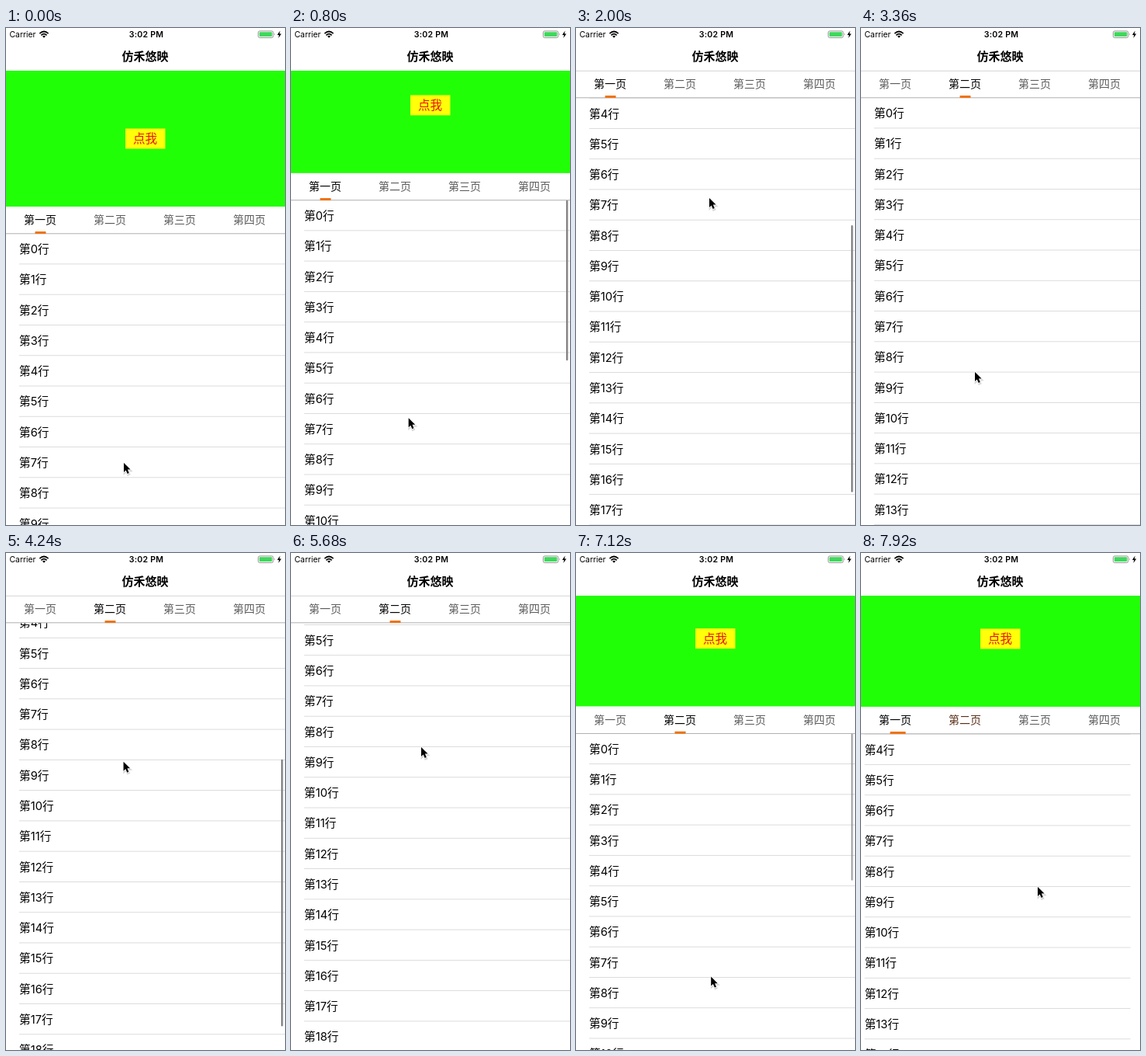
These frames come from a looping animation (360x640 px, 8 s). An HTML page:

```html
<!DOCTYPE html>
<html lang="zh">
<head>
<meta charset="utf-8">
<style>
html, body { margin: 0; width: 100%; height: 100%; overflow: hidden; background: #fff; }
svg { display: block; width: 360px; height: 640px; font-family: Inter, "Noto Sans CJK SC", "Noto Sans CJK", sans-serif; }
</style>
</head>
<body>
<svg id="stage" viewBox="0 0 360 640"></svg>
<script>
const LOOP = 8000, STEP = 80;
const WIDTH = 360, NAV = 55, HEADER = 175, TAB_BAR = 35, TAB_W = WIDTH / 4;
const LIST_TOP = NAV + HEADER + TAB_BAR;
const ROW = 39.27, ROWS = 20;
const BAR_RATIO = (640 - NAV) / (LIST_TOP - NAV + ROWS * ROW);
const stage = document.getElementById('stage');

function set(el, attrs) {
  for (const key in attrs) el.setAttribute(key, attrs[key]);
}
function add(parent, tag, attrs = {}, content = '') {
  const el = document.createElementNS('http://www.w3.org/2000/svg', tag);
  set(el, attrs);
  el.textContent = content;
  return parent.appendChild(el);
}
const rect = (parent, x, y, width, height, fill, more) =>
  add(parent, 'rect', { x, y, width, height, fill, ...more });
// Text placed by its vertical centre.
const label = (parent, x, cy, size, content, more) =>
  add(parent, 'text', { x, y: cy + size * 0.37, 'font-size': size, ...more }, content);
const centred = { 'text-anchor': 'middle' };

// Eased progress from 0 to 1 between two times.
function ramp(t, from, to) {
  const u = Math.min(1, Math.max(0, (t - from) / (to - from)));
  return u * u * (3 - 2 * u);
}

const firstScroll = t => 331.6 * ramp(t, 450, 2000);
const secondScroll = t => HEADER + 193.6 * ramp(t, 3520, 4400) - 336.6 * ramp(t, 5780, 7145);
const pageShift = t => ramp(t, 2640, 3360) - ramp(t, 7280, LOOP);
// The scroll bar fades in quickly and out slowly.
const flash = (t, from, to) => ramp(t, from, from + 160) - ramp(t, to, to + 320);
const barAlpha = t => flash(t, 320, 2080) + flash(t, 3520, 4800) + flash(t, 5760, 7000);

const cursorStart = { x: 152, y: 560 };
const cursorMoves = [
  { from: 400, to: 1930, dx: -2, dy: -341 },
  { from: 1200, to: 2000, dx: 22, dy: 0 },
  { from: 2240, to: 2560, dx: 98, dy: 224 },
  { from: 2720, to: 3360, dx: -123, dy: 0 },
  { from: 3520, to: 4400, dx: 5, dy: -191 },
  { from: 4800, to: 5600, dx: 4, dy: 18 },
  { from: 5600, to: 5680, dx: 12, dy: -20 },
  { from: 5760, to: 6960, dx: 22, dy: 327 },
  { from: 7040, to: 7300, dx: -70, dy: -139 },
  { from: 7300, to: 7920, dx: 108, dy: -8 }
];
const cursorAt = t => cursorMoves.reduce(({ x, y }, move) => {
  const k = ramp(t, move.from, move.to);
  return { x: x + move.dx * k, y: y + move.dy * k };
}, cursorStart);

rect(stage, 0, 0, WIDTH, 640, '#fff');

const pages = [0, 1].map(() => {
  const page = add(stage, 'g');
  for (let i = 0; i < ROWS; i++) {
    label(page, 17, (i + 0.5) * ROW, 14.7, `第${i}行`);
    rect(page, 17, (i + 1) * ROW - 0.8, WIDTH - 17, 0.9, '#d8d8d8');
  }
  return page;
});
const bar = rect(stage, 355, 0, 2.4, (640 - NAV) * BAR_RATIO, '#848484', { rx: 1.2 });

const header = add(stage, 'g');
rect(header, 0, NAV, WIDTH, HEADER, '#21ff06');
rect(header, 154, 129.5, 51.5, 26, '#ffff0a');
label(header, 179.5, 142.5, 15.6, '点我', { ...centred, fill: '#e8150c' });
rect(header, 0, NAV + HEADER, WIDTH, TAB_BAR, '#fff');
rect(header, 0, LIST_TOP - 0.7, WIDTH, 1, '#b0b0b0');
const tabs = [...'一二三四'].map((n, i) =>
  label(header, 44 + i * TAB_W, 247.2, 14, `第${n}页`, centred));
const indicator = rect(header, 37.5, LIST_TOP - 2.9, 14, 2.9, '#ee7414', { rx: 0.6 });

rect(stage, 0, 0, WIDTH, NAV, '#fff');
const hairline = rect(stage, 0, NAV - 0.2, WIDTH, 0.9, '#cfcfcf');
label(stage, 179.5, 36.5, 15, '仿禾悠映', { ...centred, 'font-weight': 600 });

label(stage, 4.5, 8.3, 10.4, 'Carrier');
label(stage, 181, 8.3, 10.6, '3:02 PM', { ...centred, 'font-weight': 600, 'letter-spacing': 0.2 });
const wifi = add(stage, 'g', { fill: 'none', stroke: '#000', 'stroke-width': 1.7 });
add(wifi, 'path', { d: 'M43.4 7.2Q49 1.8 54.6 7.2M45.4 9.4Q49 6 52.6 9.4' });
add(wifi, 'path', { d: 'M47 10.6Q49 9 51 10.6L49 12.8Z', fill: '#000', stroke: 'none' });
rect(stage, 325.4, 3.9, 19.4, 8.6, '#fff', { rx: 2, stroke: '#8c8c8c', 'stroke-width': 0.9 });
rect(stage, 326.8, 5.3, 16.6, 5.8, '#3fd85c', { rx: 0.8 });
add(stage, 'path', { d: 'M346 6.6q1.6 1.6 0 3.2z', fill: '#8c8c8c' });
add(stage, 'path', { d: 'M353.6 3.6L350 8.9h2.3l-0.9 4 3.9-5.3h-2.4z' });

const cursor = add(stage, 'g');
const arrow = 'M0 0V12L2.7 9.4L4.7 14L6.8 13.1L4.9 8.6H8.6Z';
add(cursor, 'path', { d: arrow, transform: 'translate(.6 1.6)', opacity: 0.16, stroke: '#000', 'stroke-width': 2 });
add(cursor, 'path', { d: arrow, stroke: '#fff', 'stroke-width': 1.6, 'stroke-linejoin': 'round', 'paint-order': 'stroke' });

function render(t) {
  const shift = pageShift(t);
  const scrolls = [firstScroll(t), secondScroll(t)];
  const active = t < 2720 ? scrolls[0] : scrolls[1];
  const lift = Math.min(HEADER, active);

  pages.forEach((page, i) => {
    const y = LIST_TOP - lift - Math.max(0, scrolls[i] - HEADER);
    set(page, { transform: `translate(${(i - shift) * WIDTH} ${y})` });
  });
  set(bar, { y: NAV + 4 + active * BAR_RATIO, opacity: barAlpha(t) });
  set(header, { transform: `translate(0 ${-lift})` });
  set(hairline, { opacity: lift > HEADER - 1 ? 1 : 0 });

  const selected = Math.round(shift);
  const swiping = shift > 0 && shift < 1;
  tabs.forEach((tab, i) => set(tab, {
    fill: i === selected ? '#000' : swiping && i < 2 ? '#5a3018' : '#5c5c5c'
  }));
  // The leading edge stretches first, then the trailing edge catches up.
  const right = Math.min(1, shift * 2) * TAB_W;
  const left = Math.max(0, shift * 2 - 1) * TAB_W;
  set(indicator, { x: 37.5 + left, width: 14 + right - left });

  const { x, y } = cursorAt(t);
  set(cursor, { transform: `translate(${x} ${y})` });
}

const start = performance.now();
function tick() {
  const t = (performance.now() - start) % LOOP;
  render(Math.floor(t / STEP) * STEP);
  requestAnimationFrame(tick);
}
tick();
</script>
</body>
</html>
```
